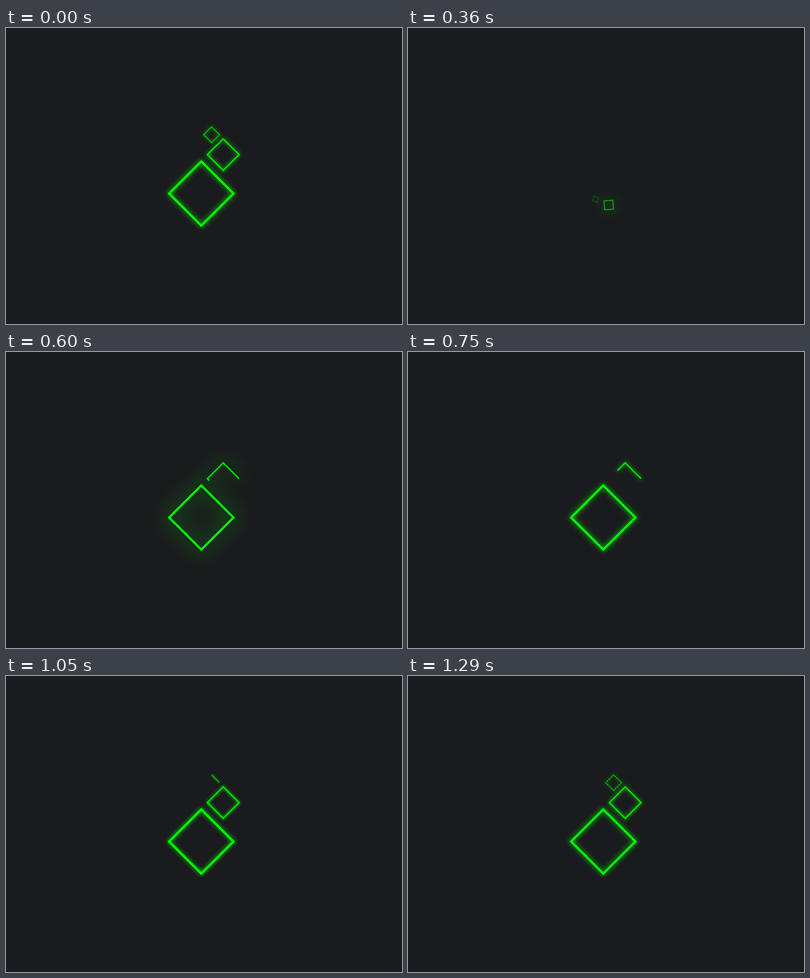
Animation, 800 px wide and 600 px high, one loop 1320 ms. Source, as an HTML page with a canvas:

```html
<!DOCTYPE html>
<html lang="en">
<head>
<meta charset="utf-8">
<title>Neon diamonds</title>
<style>
html, body { margin: 0; width: 100%; height: 100%; overflow: hidden; background: #1a1b1e; }
canvas { display: block; width: 800px; height: 600px; }
</style>
</head>
<body>
<canvas id="stage" width="800" height="600"></canvas>
<script>
const ctx = document.getElementById('stage').getContext('2d');
const LOOP = 1320, STEP = 30;
const BACKGROUND = '#1a1b1e';

const LARGE = { x: 394.5, y: 335.5, r: 65, width: 4.4, green: 255 };
const MEDIUM = { x: 438.8, y: 256.7, r: 32, width: 3.1, green: 218 };
const SMALL = { x: 415.3, y: 216.3, r: 16, width: 2.2, green: 185 };

const span = (t, from, to) => Math.min(1, Math.max(0, (t - from) / (to - from)));
const mix = (a, b, p) => a + (b - a) * p;
const pulse = (t, peak, reach) => Math.max(0, 1 - Math.abs(t - peak) / reach);

// A resting halo that dims after the rebuild, plus a wide flare as shapes leave and return.
function halo(t, rest) {
  const level = t < 600 ? 1 : mix(0.4, 1, span(t, 870, 1200));
  return rest * level + 27 * pulse(t, 120, 120) + 38 * pulse(t, 600, 180);
}

// The outline runs counterclockwise from the right corner.
function diamond({ x, y, r, width, green, glow, turn = 0, trim = 1, alpha = 1, dash }) {
  if (r < 0.5 || trim <= 0 || alpha <= 0) return;
  const length = 4 * Math.SQRT2 * r;
  ctx.save();
  ctx.translate(x, y);
  ctx.rotate(turn);
  ctx.globalAlpha = alpha;
  ctx.lineWidth = width;
  ctx.strokeStyle = ctx.shadowColor = `rgb(0,${green},0)`;
  ctx.shadowBlur = glow;
  ctx.beginPath();
  ctx.moveTo(r, 0);
  ctx.lineTo(0, -r);
  ctx.lineTo(-r, 0);
  ctx.lineTo(0, r);
  ctx.closePath();
  if (dash) ctx.setLineDash(dash);
  else if (trim < 1) ctx.setLineDash([length * trim, length]);
  ctx.stroke();
  ctx.restore();
}

// Shrinks away, then spins back in from a small seed below the centre.
function drawLarge(t) {
  const glow = halo(t, 11);
  if (t < 300) {
    diamond({ ...LARGE, r: LARGE.r * (1 - span(t, 0, 90)), glow });
    return;
  }
  const grow = span(t, 360, 540);
  diamond({
    ...LARGE,
    x: LARGE.x + 11 * (1 - grow),
    y: LARGE.y + 23.4 * (1 - grow),
    r: mix(12.7, LARGE.r, grow),
    width: mix(2.2, LARGE.width, grow),
    turn: mix(-0.855, 0, grow),
    alpha: mix(0.58, 1, grow) * span(t, 300, 360),
    glow: glow + 16 * pulse(t, 360, 180)
  });
}

// Returns as a partial outline that recedes before it closes.
function drawMedium(t) {
  const leaving = t < 300;
  const trim = 0.53 * span(t, 540, 600) - 0.28 * span(t, 600, 870) + 0.75 * span(t, 870, 1050);
  diamond({
    ...MEDIUM,
    r: leaving ? MEDIUM.r * (1 - span(t, 60, 210)) : MEDIUM.r,
    trim: leaving ? 1 : trim,
    glow: halo(t, 9)
  });
}

// Slides out of the medium diamond, then retraces its outline.
function drawSmall(t) {
  const leaving = t < 300;
  const away = leaving ? 0 : 1 - span(t, 780, 930);
  diamond({
    ...SMALL,
    x: SMALL.x + 22 * away,
    y: SMALL.y + 15 * away,
    r: SMALL.r * (leaving ? 1 - span(t, 120, 270) : span(t, 780, 840)),
    trim: 1 - 0.75 * span(t, 960, 1050) + 0.75 * span(t, 1050, 1200),
    dash: t >= 1230 ? [4, 1.5] : null,
    glow: halo(t, 7)
  });
}

function drawSpark(t) {
  const drift = span(t, 300, 450);
  diamond({
    x: mix(373, 388, drift), y: mix(349, 344, drift), r: 7,
    width: 2, green: 200, glow: 20, turn: -0.35, dash: [3, 2],
    alpha: 0.4 * pulse(t, 360, 75)
  });
}

function draw(elapsed) {
  const t = Math.floor((elapsed % LOOP) / STEP) * STEP;
  ctx.fillStyle = BACKGROUND;
  ctx.fillRect(0, 0, 800, 600);
  for (const part of [drawLarge, drawMedium, drawSmall, drawSpark]) part(t);
}

const start = performance.now();
function tick() {
  draw(performance.now() - start);
  requestAnimationFrame(tick);
}
tick();
</script>
</body>
</html>
```
